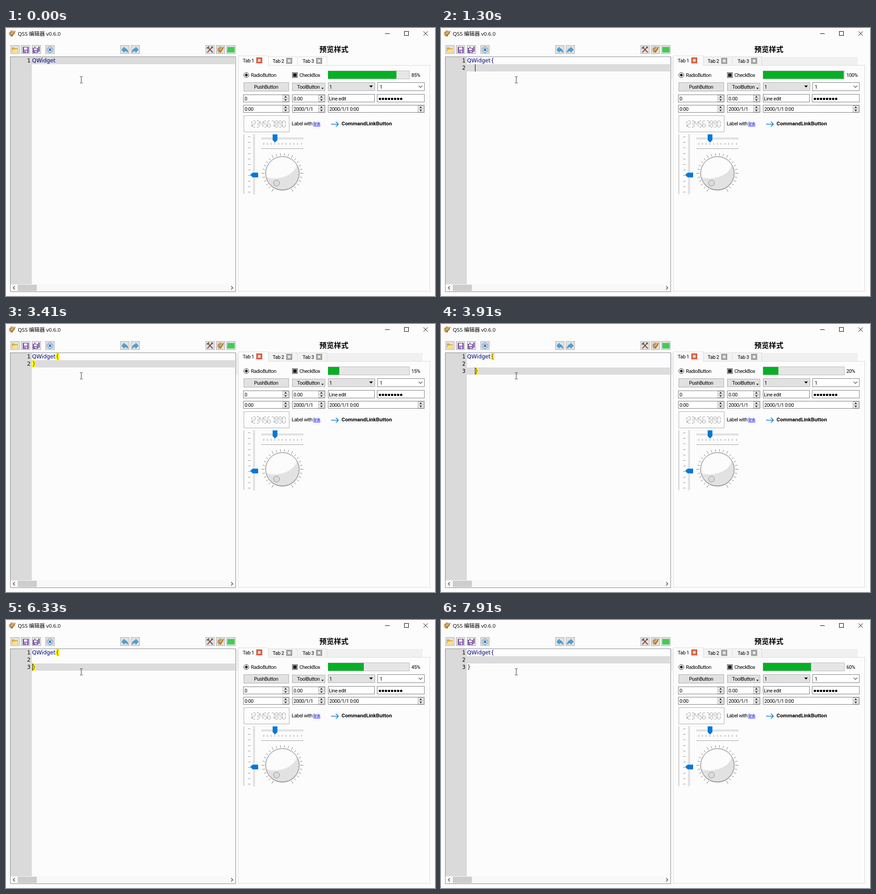
Write an HTML page that moves like this. It is 946x592 px and loops after 8 s.

```html
<!DOCTYPE html>
<html lang="zh">
<head>
<meta charset="utf-8">
<title>QSS 编辑器</title>
<style>
html, body { margin: 0; width: 100%; height: 100%; overflow: hidden; background: #fcfcfc; }
svg { display: block; width: 946px; height: 592px; }
rect { shape-rendering: crispEdges; }
text { font: 11px Roboto, sans-serif; letter-spacing: -.4px; white-space: pre; }
text.title { font: 11.6px "Open Sans", "Noto Sans CJK SC", "Noto Sans CJK", sans-serif; letter-spacing: 0; }
text.head { font: bold 16px "Noto Sans CJK SC", "Noto Sans CJK", sans-serif; letter-spacing: 0; }
text.bold { font: bold 11.7px Roboto, sans-serif; letter-spacing: 0; }
text.code { font: 12px "DejaVu Sans", sans-serif; letter-spacing: 0; }
</style>
</head>
<body>
<svg id="stage" viewBox="0 0 946 592"></svg>
<script>
const stage = document.getElementById('stage');
const NAVY = '#000080', GREY = '#adadad', FACE = '#e1e1e1', EDGE = '#7a7a7a', BLUE = '#0078d7';

const rect = (x, y, w, h, fill) =>
  `<rect x="${x}" y="${y}" width="${w}" height="${h}" fill="${fill}"/>`;
const box = (x, y, w, h, fill, stroke) =>
  rect(x, y, w, h, stroke) + rect(x + 1, y + 1, w - 2, h - 2, fill);
const path = (d, stroke = '#000', width = 1, fill = 'none') =>
  `<path d="${d}" stroke="${stroke}" stroke-width="${width}" fill="${fill}"/>`;
const shape = (d, fill) => `<path d="${d}" fill="${fill}"/>`;
const disc = (x, y, r, fill, stroke = 'none') =>
  `<circle cx="${x}" cy="${y}" r="${r}" fill="${fill}" stroke="${stroke}"/>`;
const text = (x, y, str, cls = '', fill = '#000', attrs = '') =>
  `<text x="${x}" y="${y}" class="${cls}" fill="${fill}" ${attrs}>${str}</text>`;
const at = (x, y, body) => `<g transform="translate(${x} ${y})">${body}</g>`;
const repeat = (n, draw) => Array.from({ length: n }, (_, i) => draw(i)).join('');

const palette = path('M1 6Q3 0 9 1Q15 3 13 8Q11 8 10 10Q10 14 6 14Q0 12 1 6Z', '#b9782a', .7, '#f0bb62') +
  disc(4, 6, 1.4, '#d13b2e') + disc(7, 3.7, 1.3, '#4b9b4b') + disc(4.6, 10, 1.4, '#3f72bd') +
  path('M14.500 1.500L8 10', '#9a5a2b', 1.4) + path('M8.5 9.500L6.5 12.5', '#555', 1.6);
const floppy = (s = 1) => `<g transform="scale(${s})">` +
  box(0, 0, 13, 13, '#8e63b5', '#65408c') + rect(3, 1, 7, 5, '#fff') +
  rect(3, 8, 7, 4, '#e3d9ee') + rect(4, 9, 2, 3, '#65408c') + '</g>';
const curvedArrow =
  path('M0 6L6 0V3Q13 3 14 12Q11 8 6 8.500V12Z', '#2678b0', .8, '#45a5dc');

function titleBar() {
  return at(6, 5, palette) + text(26, 17, 'QSS 编辑器 v0.6.0', 'title') +
    rect(836, 12, 10, 1, '#000') + box(878, 7, 10, 10, '#fcfcfc', '#000') +
    path('M920.5 7.5L930 17M930 7.5L920.5 17');
}

function toolbar() {
  const icons = [
    [10, shape('M3 5h5l1 2h7v9H3z', '#d9a62e') + shape('M5 9h12l-2 7H3z', '#ffdf80')],
    [33, at(3.5, 3.5, floppy())],
    [56.5, at(6, 2.5, floppy(.85)) + at(2.5, 6, floppy(.85))],
    [87, disc(10, 10, 6.3, '#e6f1fc', '#2765b0') + path('M7 7L13 13M13 7L7 13', '#2765b0', 2)],
    [252, at(3, 4, curvedArrow)],
    [275, `<g transform="translate(17 4) scale(-1 1)">${curvedArrow}</g>`],
    [440, path('M5 5L16 16', '#555', 2) + path('M15 4L4 16', '#a5442e', 2) +
      path('M3 7L8 3M13 3L16 6', '#555', 2.5)],
    [463, at(2.5, 2.5, palette)],
    [486, rect(2, 4, 16, 12, '#41cd52')]
  ];
  return icons.map(([x, icon]) => at(x, 38, box(0, 0, 20, 19, FACE, GREY) + icon)).join('');
}

function editorFrame() {
  return box(9, 63, 498, 520, '#fcfcfc', '#828790') + rect(10, 64, 47, 502, '#dadada') +
    rect(10, 566, 496, 16, '#f8f8f8') + rect(26, 567, 42, 14, '#cdcdcd') +
    path('M19.5 570.5L16 574L19.5 577.5M496.5 570.5L500 574L496.5 577.5', '#505050', 1.5);
}

function tabs(face) {
  const close = (x, y, fill, line) => box(x, y, 13, 13, fill, line) +
    path(`M${x + 4} ${y + 4}l5 5m0 -5l-5 5`, '#fff', 1.8);
  return box(578, 63, 65, 20, face, '#dcdcdc') + box(642, 63, 66, 20, face, '#dcdcdc') +
    rect(512, 61, 67, 22, '#dcdcdc') + rect(513, 62, 65, 21, '#fcfcfc') +
    text(522, 76, 'Tab 1') + text(588, 77, 'Tab 2') + text(654, 77, 'Tab 3') +
    close(552, 65, '#e0694b', '#b9492f') + close(618, 66, '#a9a9a9', '#858585') +
    close(684, 66, '#a9a9a9', '#858585');
}

function spin(x, y, w, value) {
  const b = x + w - 15;
  return box(x, y, w, 17, '#fff', EDGE) + text(x + 3, y + 13, value) +
    box(b, y + 1, 13, 8, '#f0f0f0', GREY) + box(b, y + 8, 13, 8, '#f0f0f0', GREY) +
    shape(`M${b + 3.5} ${y + 6.5}h6l-3 -3.5zM${b + 3.5} ${y + 10.5}h6l-3 3.5z`, '#222');
}

function lcd() {
  const segs = ['M1 0H5', 'M6 1V6', 'M6 8V13', 'M1 14H5', 'M0 8V13', 'M0 1V6', 'M1 7H5'];
  const digits = ['12', '01346', '01236', '1256', '02356', '023456', '012', '0123456', '012356', '012345'];
  return box(524, 193, 101, 37, '#fcfcfc', GREY) + digits.map((on, i) => {
    const d = [...on].map(s => segs[s]).join('');
    return at(536 + 8.2 * i, 205, path(d, '#a0a0a0', 1.7) + path(d, '#f4f4f4', .6));
  }).join('');
}

function sliders() {
  return rect(524, 235, 1, 132, '#a0a0a0') +
    repeat(11, i => rect(534, Math.round(240 + 12.2 * i), 5, 1, '#8c8c8c')) +
    box(545, 235, 4, 132, '#e7e7e7', '#d6d6d6') + shape('M538.5 324.500L544 319.5H556V330H544Z', BLUE) +
    box(563, 242, 93, 4, '#e7e7e7', '#d6d6d6') + shape('M588 235H598.5V247.5L593.2 253L588 247.5Z', BLUE) +
    repeat(11, i => rect(Math.round(567.5 + 8.3 * i), 254, 1, 4, '#8c8c8c')) +
    rect(563, 266, 93, 1, '#a0a0a0');
}

function dial() {
  const ticks = repeat(26, i => {
    const a = (240 - 12 * i) * Math.PI / 180, c = Math.cos(a), s = -Math.sin(a);
    const end = i % 5 ? 44.5 : 46.5;
    return path(`M${39.5 * c} ${39.5 * s}L${end * c} ${end * s}`, '#777');
  });
  return at(609.5, 321, ticks + disc(0, 0, 37, '#fcfcfc') +
    shape('M-36 8C-16 16 22 10 32 -18A37 37 0 1 1 -36 8Z', '#e2e2e2') +
    path('M-29 22A36.500 36.5 0 0 0 29 22', '#d4d4d4', 2) + disc(0, 0, 37, 'none', '#606060') +
    disc(-13, 21.5, 6.5, '#dcdcdc', '#8a8a8a'));
}

function widgets() {
  return box(512, 82, 423, 500, '#fcfcfc', '#dcdcdc') + text(691, 52.5, '预览样式', 'head') +
    disc(530, 104, 5.5, '#fff', '#333') + disc(530, 104, 3, '#222') + text(540, 108, 'RadioButton') +
    box(631, 98, 12, 12, '#fff', '#333') + rect(633, 100, 8, 8, '#222') + text(647, 108, 'CheckBox') +
    box(524, 120, 100, 20, FACE, GREY) + text(547, 134, 'PushButton') +
    box(631, 121, 73, 18, FACE, GREY) + text(642, 134, 'ToolButton') +
    shape('M695.5 132h5l-2.5 3z', '#000') +
    box(710, 120, 104, 19, FACE, GREY) + text(713, 134, '1') + shape('M801 127h8l-4 4.5z', '#000') +
    box(819, 120, 104, 19, '#fff', EDGE) + text(824, 134, '1') +
    path('M910 127.5L914 131.5L918 127.5', '#444', 1.1) +
    spin(523, 147, 102, '0') + spin(631, 147, 73, '0.00') +
    box(710, 146, 103, 18, '#fff', EDGE) + text(712, 160, 'Line edit') +
    box(818, 146, 105, 18, '#fff', EDGE) + repeat(8, i => disc(824.5 + 6.7 * i, 156.5, 2.6, '#000')) +
    spin(523, 170, 102, '0:00') + spin(631, 170, 73, '2000/1/1') + spin(710, 170, 213, '2000/1/1 0:00') +
    lcd() + text(630, 215, 'Label with') +
    text(677.5, 215, 'link', '', '#00f', 'text-decoration="underline"') +
    path('M717 212.5H733M727.5 207L733 212.5L727.5 218', BLUE, 1.5) +
    text(740, 215, 'CommandLinkButton', 'bold') + sliders() + dial();
}

const pointer = path('M163 107.5H165L166 108.5L167 107.5H169M166 108.5V120.5M163 121.5H165L166 120.5L167 121.5H169', '#222');

// time, current line, caret x (0 = hidden), closing brace line, closing brace x
const edits = [
  [0, 0, 0], [250, 0, 109], [770, 0, 116], [1300, 1, 75], [1860, 1, 0],
  [2110, 1, 64, 1, 58], [2640, 1, 0, 1, 58], [2890, 1, 58, 1, 58], [3410, 1, 0, 1, 58],
  [3910, 2, 75, 2, 75], [4470, 2, 0, 2, 75], [5270, 2, 71, 2, 71], [5520, 2, 66, 2, 66],
  [5770, 2, 62, 2, 62], [6050, 2, 58, 2, 58],
  [6580, 1, 58, 2, 58], [6860, 1, 75, 2, 58], [7660, 1, 0, 2, 58]
];
const progressTimes = [0, 520, 1050, 1300, 1860, 2390, 2890, 3410, 3910, 4470,
  5000, 5270, 5770, 6330, 6860, 7390, 7910];

function code(t) {
  const [, line, caret, braceLine = 0, braceX] = edits.findLast(e => e[0] <= t);
  const top = n => 64 + 16 * n;
  const matched = braceLine > 0 && braceLine === line;
  const brace = (x, n, str, color) =>
    (matched ? rect(x, top(n), 7, 16, '#ff0') : '') +
    text(x - .3, top(n) + 12, str, 'code', matched ? '#803000' : color);
  let out = rect(57, top(line), 448, 16, '#dcdcdc');
  out += repeat(Math.max(line, braceLine) + 1, i => text(46.5, top(i) + 12, i + 1, 'code'));
  out += text(57.5, 76, 'QWidget', 'code', NAVY);
  if (t >= 770) out += brace(110, 0, '{', caret === 116 ? '#6a4ad0' : NAVY);
  if (braceLine) out += brace(braceX, braceLine, '}', '#222');
  if (caret) out += rect(caret, top(line), 1, 16, '#000');
  return out;
}

function progress(t) {
  const step = progressTimes.findLastIndex(p => p <= t);
  const value = (85 + 5 * step) % 105;
  const filled = Math.max(0, Math.round(1.8 * value - 1.6));
  return box(710, 94, 180, 19, '#e6e6e6', '#bcbcbc') + rect(710, 95, filled, 17, '#06b025') +
    text(value < 10 ? 897 : 894, 108, value + '%');
}

// The repaint after the first line break exposes the darker window background.
function background(t) {
  const repainted = t >= 1300;
  return (repainted ? rect(708, 64, 211, 18, '#f0f0f0') + rect(507, 64, 5, 48, '#f0f0f0') : '') +
    tabs(repainted ? '#f2f2f2' : '#fbfbfb');
}

stage.innerHTML = titleBar() + toolbar() + editorFrame() + widgets() +
  '<g id="live"></g>' + pointer;
const live = document.getElementById('live');
const start = performance.now();
let shown = '';

function frame() {
  const t = Math.max(0, performance.now() - start) % 8000;
  const next = background(t) + code(t) + progress(t);
  if (next !== shown) live.innerHTML = shown = next;
  requestAnimationFrame(frame);
}
frame();
</script>
</body>
</html>
```
